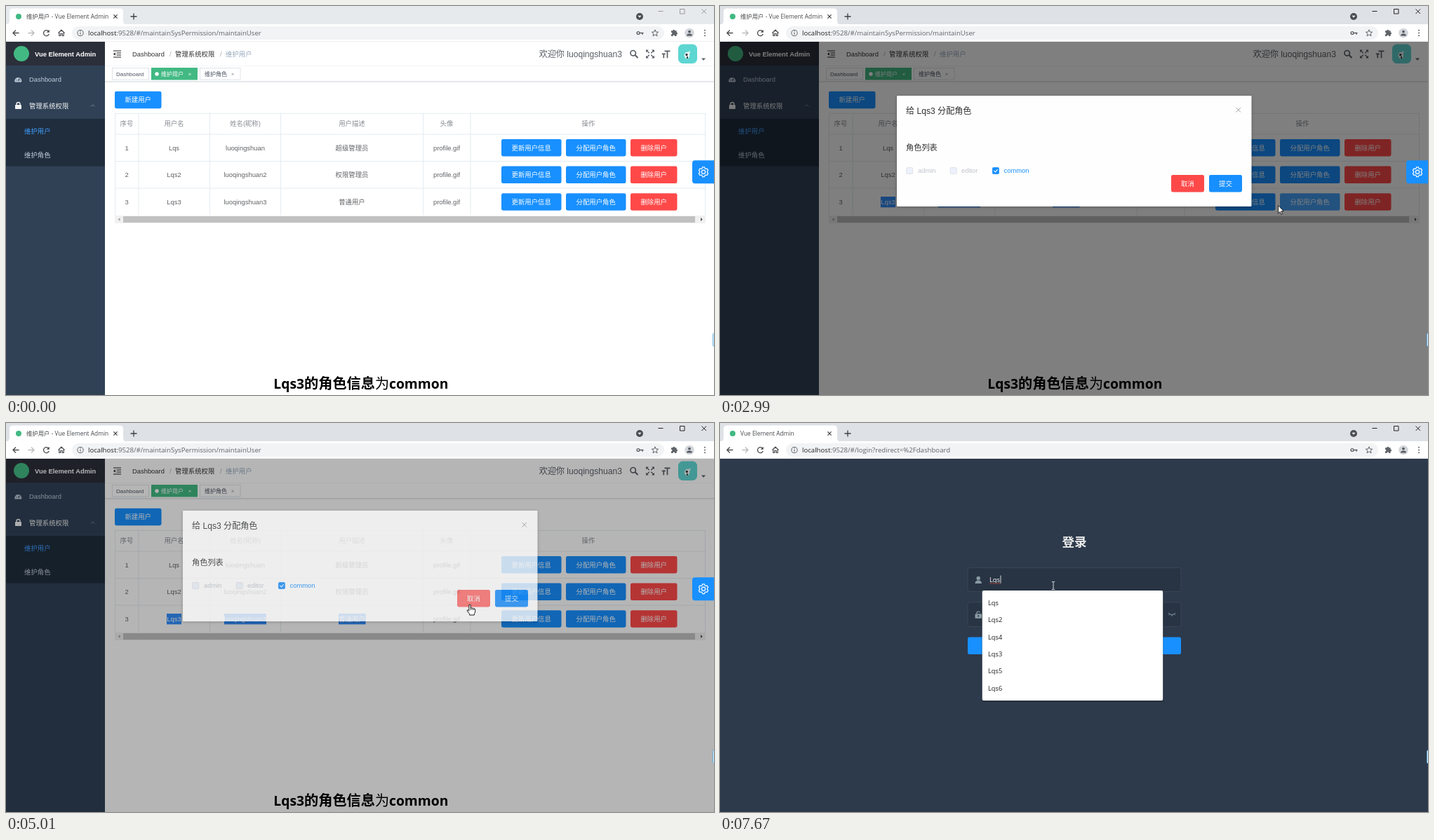
An HTML page for the animation above (8 s loop, 1009 by 555 pixels).

```html
<!DOCTYPE html>
<html lang="zh">
<head>
<meta charset="utf-8">
<title>Vue Element Admin</title>
<style>
html, body { margin: 0; width: 100%; height: 100%; overflow: hidden; background: #fff; }
svg { display: block; width: 1009px; height: 555px; }
text { font-family: "Liberation Sans", "Noto Sans CJK SC", "Noto Sans CJK", sans-serif; white-space: pre; }
.ui { font-family: "Open Sans", "Noto Sans CJK SC", "Noto Sans CJK", sans-serif; }
</style>
</head>
<body>
<svg id="stage" viewBox="0 0 1009 555" xmlns="http://www.w3.org/2000/svg"></svg>
<script>
const LOOP = 8000, BLUE = '#1890ff', RED = '#ff4949', GREEN = '#42b983';
const NAME = 'luoqingshuan', USER = 'Lqs';

// ---------- markup helpers ----------
const rect = (x, y, w, h, fill, more = '') =>
  `<rect x="${x}" y="${y}" width="${w}" height="${h}" fill="${fill}" ${more}/>`;
const text = (x, y, s, size, fill, more = '') =>
  `<text x="${x}" y="${y}" font-size="${size}" fill="${fill}" ${more}>${s}</text>`;
const mid = (x, y, s, size, fill, more = '') => text(x, y, s, size, fill, 'text-anchor="middle" ' + more);
const dot = (x, y, r, fill, more = '') => `<circle cx="${x}" cy="${y}" r="${r}" fill="${fill}" ${more}/>`;
const line = (d, stroke, w = 1, more = '') => `<path d="${d}" fill="none" stroke="${stroke}" stroke-width="${w}" ${more}/>`;
const shape = (d, fill, more = '') => `<path d="${d}" fill="${fill}" ${more}/>`;
const group = (id, s, more = '') => `<g id="${id}" ${more}>${s}</g>`;
const cross = (x, y, r, c, w = 1) => line(`M${x - r} ${y - r}l${2 * r} ${2 * r}m0 ${-2 * r}l${-2 * r} ${2 * r}`, c, w);
const button = (x, y, w, s, fill, id = '') =>
  rect(x, y, w, 24.5, fill, `rx="2.4" ${id && `id="${id}"`}`) + mid(x + w / 2, y + 15.7, s, 9.4, '#fff');

// ---------- browser frame ----------
function browser() {
  const k = '#5f6368';
  return rect(0, 0, 1009, 27, '#dee1e6', 'id="strip"') +
    shape('M0 26.5Q5 26.5 5 21V8Q5 3.500 10 3.500H162Q167 3.500 167 8V21Q167 26.500 172 26.500Z', '#fff') +
    rect(0, 26, 1009, 25, '#fff') + rect(0, 50.5, 1009, .7, '#dadce0') +
    dot(18, 15, 4, GREEN) + cross(156, 15, 2.6, '#3c4043', 1.2) +
    line('M177.500 15h9M182 10.500v9', '#3c4043', 1.3) +
    dot(903, 15, 5, '#4b4e52') + shape('M900.500 13.700h5l-2.500 3z', '#fff') +
    group('controls', line('M929.500 7.500h7M960.500 4.500h6.500v6.500h-6.500zM991.500 4.500l6.500 6.500m0-6.500l-6.500 6.500', 'inherit', 1), 'stroke="#222"').replace('stroke="inherit" ', '') +
    line('M18.500 38.500H10M14 34.500l-4 4 4 4', '#4a4d51', 1.3) +
    line('M31.500 38.500H40M36 34.500l4 4-4 4', '#b9bbbe', 1.3) +
    line('M60.800 36.200A4 4 0 1 0 61.300 40', '#4a4d51', 1.3) + shape('M61.800 33.800v4h-4z', '#4a4d51') +
    line('M74.500 38.500l4.500-4.300 4.500 4.300M75.800 38v4.500h2v-3h2.400v3h2V38', '#4a4d51', 1.2) +
    rect(94, 29, 844, 19, '#f1f3f4', 'rx="9.500"') +
    dot(106, 38.5, 4.1, 'none', `stroke="${k}"`) + line('M106 37.800v3M106 35.600v1.200', k, 1.1) +
    dot(901, 38.5, 1.9, 'none', `stroke="${k}" stroke-width="1.400"`) + line('M903 38.500h5.500M907 38.500v2.200', k, 1.5) +
    line('M925 33.800l1.300 3.200 3.400.2-2.600 2.200.9 3.400-3-1.900-3 1.900.9-3.400-2.600-2.200 3.400-.2z', k, 1) +
    shape('M948 35.200h2.300a1.500 1.500 0 0 1 3 0h2.300v2.400a1.500 1.500 0 0 1 0 3v2.400h-2.400a1.400 1.400 0 0 0-2.800 0H948v-2.500a1.400 1.400 0 0 0 0-2.800z', k) +
    dot(974, 38.5, 6.8, '#d3d6db') + dot(974, 36.6, 1.9, '#555a61') + shape('M970 42.500q0-3 4-3t4 3z', '#555a61') +
    [34.700, 38.500, 42.300].map(y => dot(996, y, 1, k)).join('');
}
const address = (title, rest) => text(29, 18.2, title, 8.4, '#45484c', 'class="ui"') +
  text(117, 42, `<tspan fill="#202124">localhost</tspan>:9528/#/${rest}`, 9.65, '#5f6368', 'class="ui"');

// ---------- admin page ----------
const lockIcon = (x, y, c) => rect(x - 4.5, y - 1, 9, 6, c, 'rx=".8"') + line(`M${x - 2.500} ${y}v-2a2.500 2.500 0 0 1 5 0v2`, c, 1.4);

function sidebar() {
  return rect(0, 51, 141, 504, '#304156') + rect(0, 51, 141, 34, '#2b2f3a') + rect(0, 161, 141, 67.5, '#1f2d3d') +
    dot(22, 68, 11, GREEN) + text(41, 71.8, 'Vue Element Admin', 9.38, '#fff', 'font-weight="700"') +
    shape('M12.500 108.500a5 5 0 1 1 9.600 0z', '#bfcbd9') + line('M17.300 107l1.600-3.500', '#304156', 1.2) +
    dot(14.8, 105.800, .7, '#304156') + dot(20, 105.8, .7, '#304156') +
    text(33, 108, 'Dashboard', 9.4, '#bfcbd9') +
    lockIcon(17.500, 142, '#f4f4f5') + text(33, 145.8, '管理系统权限', 9.4, '#f4f4f5') +
    line('M121 143.500l2.700-2.700 2.700 2.700', '#7d8a99', .9) +
    text(26, 181.8, '维护用户', 9.4, '#409eff') + text(26, 215.800, '维护角色', 9.4, '#bfcbd9');
}

function navbar() {
  const k = '#5a5e66', tag = (x, w) => rect(x + .5, 88.5, w - 1, 16.5, '#fff', 'stroke="#d8dce5" stroke-width=".8"');
  const corner = (sx, sy) => `<g transform="translate(918 68.500) scale(${sx} ${sy})">` +
    line('M1.300 1.300L4.800 4.800', k, 1.3) + shape('M6 6H2.200L6 2.200z', k) + '</g>';
  return line('M153 64h11M157.500 67h6.500M157.500 70h6.500M153 73h11', '#222', 1.2) + shape('M155.800 66.200v4.600l-2.800-2.300z', '#222') +
    text(180, 71.8, 'Dashboard', 9.4, '#303133') + text(233, 71.800, '/', 9.4, '#a5abb5') +
    text(241, 71.8, '管理系统权限', 9.4, '#303133') + text(305, 71.8, '/', 9.4, '#a5abb5') +
    text(313, 71.8, '维护用户', 9.4, '#97a8be') +
    text(878, 72.8, `欢迎你 ${NAME}3`, 12.1, k, 'text-anchor="end"') +
    dot(893.7, 67.2, 3.7, 'none', `stroke="${k}" stroke-width="1.700"`) + line('M896.500 70l4 4', k, 2) +
    corner(1, 1) + corner(-1, 1) + corner(1, -1) + corner(-1, -1) +
    line('M938.500 64.300h8M942.500 64.300v10M934.800 68.300h5M937.300 68.300v6', k, 1.7) +
    rect(958, 54.5, 27, 27.5, '#5ed6d2', 'rx="6.500"') +
    group('bird', shape('M966.500 70q2-5.500 5-4l4-2-1.500 4q1 6-3.500 7.500-3-1-4-5.500z', '#f2f6f5') + dot(970, 69.5, 1.7, '#27383c') + rect(970, 72, 1.8, 3, '#27383c')) +
    shape('M991 74.500h6l-3 3.200z', k) +
    rect(141, 85, 868, .6, '#eceef1') + rect(141, 107.3, 868, .9, '#d2d5da') + rect(141, 108.2, 868, 1.2, '#eff0f2') +
    tag(151, 53) + text(157, 99.8, 'Dashboard', 8.04, '#495060') +
    rect(207, 88, 66, 17.5, GREEN) + dot(215, 97, 2.7, '#fff') + text(221, 99.900, '维护用户', 8.04, '#fff') + cross(262, 97.3, 1.5, '#fff', .8) +
    tag(276, 58.5) + text(283, 99.9, '维护角色', 8.04, '#495060') + cross(323, 97.3, 1.5, '#8a909b', .8);
}

const cols = [172, 239.5, 341, 493, 628, 830], rowTop = r => 183 + 38.6 * r;
const acts = [['更新用户信息', 706, 85.5, BLUE], ['分配用户角色', 798, 85.5, BLUE], ['删除用户', 890, 66.5, RED]];
const roles = ['超级管理员', '权限管理员', '普通用户'];

function table() {
  let s = button(155, 121.700, 66.5, '新建用户', BLUE);
  ['序号', '用户名', '姓名(昵称)', '用户描述', '头像', '操作'].forEach((h, i) => s += mid(cols[i], 171, h, 9.4, '#868a91'));
  roles.forEach((role, r) => {
    const y = rowTop(r), n = r ? r + 1 : '';
    s += rect(155, y, 842, 38.6, '#f5f7fa', `id="row${r}"`);
    [r + 1, USER + n, NAME + n, role, 'profile.gif'].forEach((v, i) => s += mid(cols[i], y + 22.6, v, 9.4, '#606266'));
    acts.forEach(([label, x, w, c], k) => s += button(x, y + 7, w, label, c, `act${r}${k}`));
  });
  s += line('M155.500 153V310M189 153V298.500M290.500 153V298.500M391.500 153V298.500M594.500 153V298.500M662 153V298.500M996.500 153V310' +
    'M155 153.300H997M155 183H997M155 221.500H997M155 260H997', '#dfe6ec', .8);
  const picks = [[229, 21, USER + '3'], [311, 60, NAME + '3'], [474, 38.500, roles[2]]];
  s += '<clipPath id="dragClip"><rect id="drag" x="225" y="265" width="0" height="30"/></clipPath>' +
    group('picked', picks.map(([x, w, v], i) => rect(x, 272, w, 15.3, '#3390ff') + mid(cols[i + 1], rowTop(2) + 22.6, v, 9.4, '#fff')).join(''), 'clip-path="url(#dragClip)"');
  return s + rect(155, 299, 842, 11, '#f1f1f1') + rect(167, 300, 815, 9, '#c1c1c1') +
    shape('M162.500 302v5l-2.700-2.500z', '#a3a3a3') + shape('M990 302v5l2.700-2.500z', '#505050');
}

const menuItems = ['Profile', 'Dashboard', 'Source', 'Docs', 'Log Out'];
const menuY = i => 98.700 + 24.1 * i + (i > 3 ? 8 : 0);
function popups() {
  const tip = shape('M937.500 94l3.700-4 3.700 4z', '#303133') + rect(914, 93.5, 54.5, 22.5, '#303133', 'rx="2.700"') + mid(941.2, 107.5, 'Global Size', 8.04, '#fff');
  const menu = rect(916, 92, 73, 142, '#fff', 'rx="2.700" stroke="#e6ebf5" stroke-width=".7" style="filter:drop-shadow(0 1px 4px #0002)"') +
    rect(916, 199, 73, .7, '#e6ebf5') +
    menuItems.map((v, i) => rect(916, menuY(i), 73, 24.1, '#e8f4ff', `id="mb${i}"`) +
      text(929.5, menuY(i) + 15.4, v, 9.4, '#606266', `id="mt${i}"`)).join('');
  return group('tip', tip) + group('menu', menu);
}

function dialog() {
  const box = (x, fill, edge) => rect(x, 230.6, 9, 9, fill, `rx="1.300" stroke="${edge}" stroke-width=".8"`);
  return rect(252, 128, 505.5, 158, '#fff', 'rx="1.300" style="filter:drop-shadow(0 1px 2px #0004)"') +
    text(265, 154, `给 ${USER}3 分配角色`, 12.1, '#303133') + cross(738.700, 148.3, 3.2, '#909399', .9) +
    text(265, 206.3, '角色列表', 11.2, '#303133', 'font-weight="500"') +
    box(265.700, '#edf2fc', '#dcdfe6') + text(282, 238, 'admin', 9.4, '#c0c4cc') +
    box(328.2, '#edf2fc', '#dcdfe6') + text(344, 238, 'editor', 9.4, '#c0c4cc') +
    box(388.4, BLUE, BLUE) + line('M390.500 235l1.900 1.900 3.200-3.600', '#fff', 1.1) + text(404.5, 238, 'common', 9.4, BLUE) +
    button(643, 241, 47, '取消', RED, 'cancel') + button(697, 241, 47, '提交', BLUE);
}

function gear() {
  let d = '';
  for (let i = 0; i < 6; i++) {
    const a = (i * 60 - 90) * Math.PI / 180;
    [[-.42, 5.3], [-.2, 7], [.2, 7], [.42, 5.3]].forEach(([o, r]) =>
      d += (d ? 'L' : 'M') + (994 + r * Math.cos(a + o)).toFixed(2) + ' ' + (236.7 + r * Math.sin(a + o)).toFixed(2));
  }
  return shape('M1009 220.300H982q-4 0-4 4v25q0 4 4 4h27z', BLUE) +
    line(d + 'Z', '#fff', 1.2, 'stroke-linejoin="round"') + dot(994, 236.7, 2.6, 'none', 'stroke="#fff" stroke-width="1.200"');
}

function caption() {
  const bold = 'class="ui" font-weight="700"';
  return text(425, 545.5, USER + '3', 19.3, '#000', bold + ' text-anchor="end"') +
    text(425, 545.500, '的角色信息<tspan font-weight="400">为</tspan>', 20.2, '#000', bold) +
    text(546, 545.5, 'common', 19.3, '#000', bold);
}

// ---------- login page ----------
function login() {
  const k = '#889aa4', field = (y, h) => rect(353, y, 304, h, '#283443', 'rx="3.400" stroke="#3e4a59" stroke-width=".8"');
  let s = rect(0, 51, 1009, 504, '#2d3a4b') + mid(505, 175.5, '登录', 17.6, '#eee', 'font-weight="700"') +
    field(206.5, 34) + field(255.8, 34.700) +
    dot(368.2, 221.5, 2.7, k) + shape('M363.500 229q0-4.500 4.700-4.500t4.700 4.500z', k) +
    text(384, 226.5, USER, 9.4, '#fff', 'class="ui"') +
    rect(363.500, 272.2, 9.5, 6.5, k, 'rx=".8"') + line('M365.700 272.500v-1.300a2.500 2.500 0 0 1 4.800-.6', k, 1.2) + dot(368.2, 275.3, 1.1, '#283443') +
    [0, 1, 2, 3, 4, 5].map(i => dot(386 + i * 4.25, 272.5, 1.5, '#fff')).join('') +
    line('M639 271q5 5 10 0M640.800 272.500l-1.300 1.700M644 273.500v2.200M647.200 272.500l1.300 1.700', k, 1) +
    button(353, 305.6, 304, '登录', BLUE);
  let wave = 'M384 229.500';
  for (let i = 0; i < 8; i++) wave += `l1 ${i % 2 ? 1 : -1}l1 0`;
  s += group('caret', line(wave, '#e0503c', .8) + rect(399.6, 217.500, .8, 11, '#fff'));
  const list = ['', 2, 4, 3, 5, 6].map((n, i) => text(382, 260 + 24.35 * i, USER + n, 9.3, '#202124', 'class="ui"')).join('');
  s += group('list', rect(373.700, 239, 257.5, 157, '#fff', 'rx="2" style="filter:drop-shadow(0 1px 1px #0006)"') + list);
  return s + rect(0, 51, 0, 2, '#2299dd', 'id="bar"') + address('Vue Element Admin', 'login?redirect=%2Fdashboard');
}

const pointers =
  group('arrow', shape('M0 0V11.300L2.600 8.900 4.300 12.800 6 12.100 4.300 8.200H7.800Z', '#fff', 'stroke="#000" stroke-width=".8"')) +
  group('hand', shape('M-1.200 1Q-1.200 0 0 0T1.200 1V5.200Q2.200 4.300 3.300 5.300 4.600 4.700 5.500 5.900 7.500 5.500 7.700 7.300V10Q7.700 12 6.300 13.200V15H-.3V13.500L-3.700 9.300Q-4.300 7.500-2.700 7.800L-1.200 9.200Z', '#fff', 'stroke="#000" stroke-width=".9"') +
    line('M1.200 5.200V8M3.400 5.500V8M5.500 6V8', '#000', .7)) +
  group('beam', line('M-2.200-5.500h1.700l.5.500.5-.5h1.700M0-5v10M-2.200 5.500h1.700l.5-.5.5.5h1.700', 'currentColor', 1));

document.getElementById('stage').innerHTML = browser() +
  group('app', rect(141, 51, 868, 504, '#fff') + sidebar() + navbar() + table() + popups() +
    address('维护用户 - Vue Element Admin', 'maintainSysPermission/maintainUser') +
    rect(0, 51, 1009, 504, '#000', 'id="shade"') + group('dialog', dialog()) + gear() + caption()) +
  group('login', login()) +
  rect(1007.5, 467, 3, 18.5, '#d5ecfb', 'rx="1.500" stroke="#58a9de" stroke-width=".8"') +
  group('pointer', pointers);

// ---------- motion ----------
const ids = {};
document.querySelectorAll('[id]').forEach(e => ids[e.id] = e);
const show = (id, on) => ids[id].style.display = on ? '' : 'none';
const set = (id, name, v) => ids[id].setAttribute(name, v);
const ramp = (t, a, b) => Math.min(1, Math.max(0, (t - a) / (b - a)));
// CSS "ease" curve
function ease(p) {
  let lo = 0, hi = 1, u = p;
  const bez = (a, b, u) => 3 * a * u * (1 - u) ** 2 + 3 * b * u * u * (1 - u) + u ** 3;
  for (let i = 0; i < 16; i++) { u = (lo + hi) / 2; bez(.25, .25, u) < p ? lo = u : hi = u; }
  return bez(.1, 1, u);
}
const path = [[70, 440, 502], [780, 238, 284], [950, 227, 282], [1670, 400, 285], [2050, 514, 282], [2520, 803, 291],
  [2650, 815, 287], [2900, 815, 287], [3540, 460, 243], [3760, 413, 239], [3950, 424, 239], [4230, 584, 257],
  [4560, 661, 259], [5250, 661, 259], [5600, 938, 77], [5740, 974, 69], [5950, 974, 69], [6430, 956, 214],
  [6620, 956, 214], [6900, 942, 200], [7000, 942, 200], [7400, 475, 232]];
function mouse(t) {
  const i = path.findIndex(p => p[0] > t);
  if (i < 0) return path[path.length - 1].slice(1);
  if (!i) return path[0].slice(1);
  const [t0, x0, y0] = path[i - 1], [t1, x1, y1] = path[i], p = ramp(t, t0, t1), q = p * p * (3 - 2 * p);
  return [x0 + (x1 - x0) * q, y0 + (y1 - y0) * q];
}
const inside = ([x, y], l, t, w, h) => x >= l && x <= l + w && y >= t && y <= t + h;

function draw(t) {
  const pos = mouse(t), late = mouse(t - 80);
  const OPEN = 2720, CLOSE = 4960, LOGOUT = 6700;
  const modal = t > OPEN && t < CLOSE + 250, menuOpen = t > 5900 && t < 6600, onLogin = t >= LOGOUT;
  show('app', !onLogin);
  show('login', onLogin);

  const active = t >= 890;
  set('strip', 'fill', active ? '#dee1e6' : '#e7eaed');
  set('controls', 'stroke', active ? '#222' : '#999');

  let hot = false;
  roles.forEach((_, r) => {
    const y = rowTop(r), free = !modal && !menuOpen && t > 70;
    show('row' + r, free && inside(pos, 155, y, 842, 38.6));
    acts.forEach(([, x, w, c], k) => {
      const focus = r === 2 && k === 1 && t > 2700 && t < CLOSE;
      const lit = focus || (free && inside(late, x, y + 7, w, 24.5));
      set(`act${r}${k}`, 'fill', !lit ? c : c === RED ? '#ff6d6d' : '#46a6ff');
      if (free && inside(pos, x, y + 7, w, 24.5)) hot = true;
    });
  });
  set('drag', 'width', t < 950 ? 0 : Math.min(pos[0] - 225, 290) * (t < 2050) + 290 * (t >= 2050));

  const shut = t >= CLOSE;
  const veil = shut ? 1 - ease(ramp(t, CLOSE, CLOSE + 200)) : ease(ramp(t, OPEN, OPEN + 200));
  const pop = shut ? 1 - ease(ramp(t, CLOSE, CLOSE + 300)) : ease(ramp(t, OPEN, OPEN + 300));
  set('shade', 'opacity', veil * .5);
  set('dialog', 'opacity', pop);
  set('dialog', 'transform', `translate(0 ${-13.4 * (1 - pop)})`);
  const onCancel = modal && inside(pos, 643, 241, 47, 24.5);
  set('cancel', 'fill', onCancel ? '#ff6d6d' : RED);

  set('tip', 'opacity', .95 * ramp(t, 5560, 5660) * (1 - ramp(t, 5770, 5900)));
  set('menu', 'opacity', ramp(t, 5900, 6050) * (1 - ramp(t, 6580, 6680)));
  menuItems.forEach((_, i) => {
    const on = menuOpen && inside(pos, 916, menuY(i), 73, 24.1);
    show('mb' + i, on);
    set('mt' + i, 'fill', on ? '#46a6ff' : '#606266');
    hot = hot || on;
  });
  set('bird', 'transform', `rotate(${(7 * Math.sin(t / 130)).toFixed(2)} 971 72)`);

  const load = t < 6850 ? .2 * ramp(t, 6700, 6850) : t < 6950 ? .2 + .507 * ramp(t, 6850, 6950) : .707 + .293 * ramp(t, 6950, 7080);
  set('bar', 'width', 1009 * load);
  set('bar', 'opacity', 1 - ramp(t, 7100, 7300));
  show('caret', t >= 7430);
  show('list', t >= 7480);

  hot = !onLogin && (hot || onCancel || inside(pos, 885, 54, 100, 29));
  const typing = onLogin ? inside(pos, 378, 207, 272, 33) : t > 760 && t < 2080;
  show('pointer', t >= 70);
  set('pointer', 'transform', `translate(${pos[0].toFixed(2)} ${pos[1].toFixed(2)})`);
  set('pointer', 'color', onLogin ? '#d5d9de' : '#222');
  show('hand', hot && !typing);
  show('beam', typing);
  show('arrow', !hot && !typing);
}

const start = performance.now();
function tick() {
  draw((performance.now() - start) % LOOP);
  requestAnimationFrame(tick);
}
draw(0);
requestAnimationFrame(tick);
</script>
</body>
</html>
```
